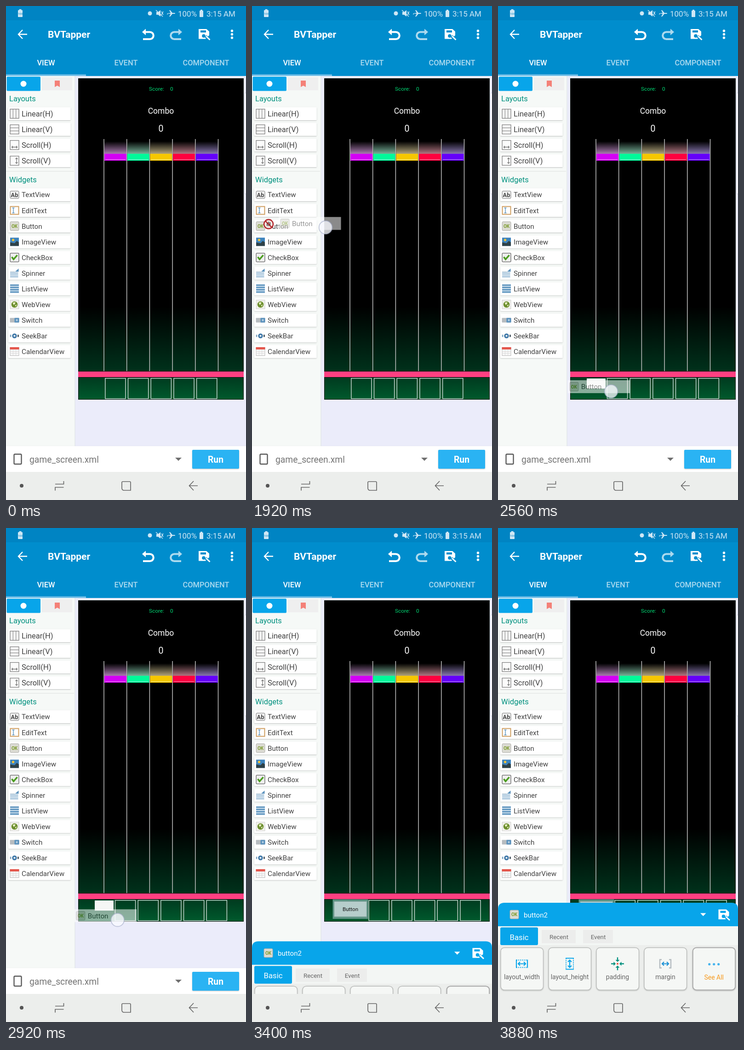
Animation, 522 px wide and 1073 px high, one loop 5.48 s. Source, as an HTML page:

```html
<!DOCTYPE html>
<html lang="en">
<head>
<meta charset="utf-8">
<title>Screen editor</title>
<style>
html, body { margin: 0; width: 100%; height: 100%; overflow: hidden; background: #ebecfa; }
svg { display: block; width: 522px; height: 1073px; font-family: Roboto, sans-serif; }
</style>
</head>
<body>
<svg id="stage" viewBox="0 0 522 1073" xmlns="http://www.w3.org/2000/svg"></svg>
<script>
const LOOP = 5480, STEP = 40;
const DRAG_START = 1760, OVER_ROW = 2520, DROP = 3160;
const PANEL = { top: 814, hidden: 1013, start: 3167, length: 663 };

const rect = (x, y, w, h, fill, more = '') =>
  `<rect x="${x}" y="${y}" width="${w}" height="${h}" fill="${fill}" ${more}/>`;
const path = (d, stroke, width = 1.5, more = '') =>
  `<path d="${d}" fill="none" stroke="${stroke}" stroke-width="${width}" ${more}/>`;
const shape = (d, fill) => `<path d="${d}" fill="${fill}"/>`;
const dot = (x, y, r, fill) => `<circle cx="${x}" cy="${y}" r="${r}" fill="${fill}"/>`;
const text = (x, y, size, fill, label, more = '') =>
  `<text x="${x}" y="${y}" font-size="${size}" fill="${fill}" ${more}>${label}</text>`;
const at = (x, y, body) => `<g transform="translate(${x} ${y})">${body}</g>`;
const mid = 'text-anchor="middle"';
const gradient = (id, stops, y1, y2) =>
  `<linearGradient id="${id}" gradientUnits="userSpaceOnUse" x1="0" x2="0" y1="${y1}" y2="${y2}">` +
  stops.map(([o, c, a = 1]) => `<stop offset="${o}" stop-color="${c}" stop-opacity="${a}"/>`).join('') +
  '</linearGradient>';

const GREY = '#858585', BLUE = '#08a5ea', BAR = '#008dcd', STEEL = '#5b92bd';
const TILES = ['#d400f5', '#00fa9a', '#f6c700', '#ff003f', '#6500fa'];
const GLOWS = ['#c08bc8', '#86c9ad', '#c8b98a', '#c98592', '#9a86c8'];

const box = rect(-9.5, -10, 19, 20, '#fcfcfc', `stroke="${GREY}" stroke-width="1.4"`);
const okIcon = rect(-9.5, -9.5, 19, 19, '#dcdcd4', 'rx="2" stroke="#a9a9a4"') +
  text(0, 3.8, 10, '#7d9c2e', 'OK', mid + ' font-weight="700"');

// Icons are centred on their own origin.
const icons = {
  'Linear(H)': box + path('M-3.2-10V10M3.2-10V10', GREY, 1.2),
  'Linear(V)': box + path('M-9.5-3.3H9.5M-9.5 3.3H9.5', GREY, 1.2),
  'Scroll(H)': box + path('M-6 4.5H6M-3.5 2L-6 4.5-3.5 7M3.5 2L6 4.5 3.5 7', '#777', 1.3),
  'Scroll(V)': box + path('M4.5-6V6M2-3.5L4.5-6 7-3.5M2 3.5L4.5 6 7 3.5', '#777', 1.3),
  TextView: rect(-9.5, -8, 19, 16, '#f0f0f0', 'rx="2" stroke="#777"') +
    text(0, 5, 13, '#333', 'Ab', mid + ' font-weight="500"'),
  EditText: rect(-9, -8.5, 18, 17, '#fff', 'stroke="#cf9f62" stroke-width="2"') +
    path('M-5-5.5H0M-2.5-5.5V5.5M-5 5.5H0', STEEL, 1.4),
  Button: okIcon,
  ImageView: rect(-9.5, -9, 19, 18, '#3e84bd') + dot(-3, -4, 2.6, '#f0c33b') +
    shape('M-9.5 1L-5 2 0 3 5-2 9.5 1V9H-9.5z', '#2e4148'),
  CheckBox: rect(-9.5, -9.5, 19, 19, '#eee', 'rx="2" stroke="#777" stroke-width="1.5"') +
    path('M-6-1L-2 4 6-5', '#4b9d20', 3.5),
  Spinner: path('M-9.5 0H8M-9.5 4H8M-9.5 8H8', STEEL, 1.4) + shape('M9-10V-3H1z', STEEL) +
    path('M-9.5-3H1', '#9ab6ca', 1.2),
  ListView: rect(-9.5, -9.5, 19, 19, '#d9e8f3') +
    path('M-9.5-8H9.5M-9.5-3H9.5M-9.5 2H9.5M-9.5 7H9.5', STEEL, 3),
  WebView: rect(-9.5, -9.5, 19, 19, '#f2f2ec', 'stroke="#ccc"') + dot(0, 0, 6.8, '#6d8f2e') +
    shape('M-4-4L2-5 1-1-2 1zM1 2L5 0 3 5z', '#e6edc2'),
  Switch: rect(-10, -5, 20, 10, '#b7bcc0', 'rx="1"') + rect(0, -5, 10, 10, STEEL, 'rx="1"') +
    path('M4-2V2M6-2V2', '#fff', 1),
  SeekBar: path('M-8.5-2.5V2.5', '#7ba3c0', 2.5) + path('M8-2.5V2.5', '#34434e', 2.5) +
    dot(0, 0, 5.2, '#3f78a8') + dot(0, 0, 2, '#fff'),
  CalendarView: rect(-9.5, -9, 19, 18, '#f6f6f6', 'stroke="#b9b9b9"') +
    rect(-10, -9.5, 20, 5, '#e4574d') + path('M-8 0H8M-8 4H8M-3-4V8M3-4V8', '#ddd', 1),
};

const item = (label, y, size) =>
  rect(5, y - 14, 135.5, 28, '#fff', 'rx="1" filter="url(#soft)"') +
  at(18.5, y, icons[label]) + text(34, y + size * .36, size, '#404040', label);

const saveIcon = ground => shape('M-12-11.5H5L11-6V2L3 10H-12z', '#fff') +
  rect(-8, -8.5, 12, 4.5, ground) + dot(-1, 3.5, 3.8, ground) +
  path('M3 4L12 12', ground, 6) + path('M4 4L12.5 12', '#fff', 3);
const turnArrow = path('M-8-5.5H4A7.7 7.7 0 0 1 4 10H-11', '#fff', 4.2) +
  shape('M-13-5.5L-5-12.5V1.5z', '#fff');

function header() {
  const status = '#cfe7f5';
  return rect(0, 0, 522, 152, BAR) + rect(0, 0, 522, 31, '#0084c3') +
    rect(26, 9, 10, 15, status, 'rx="1"') + rect(28.5, 7, 5, 3, status) +
    text(31, 19, 6, '#0084c3', '100', mid) +
    dot(313, 16, 4.5, status) +
    shape('M327 13h4l5-4v14l-5-4h-4z', status) +
    path('M326 9L341 23M338 12l4 7M342 12l-4 7', status, 1.5) +
    shape('M351 16l7-1-3-6h2l5 6h5q2 1 0 2h-5l-5 6h-2l3-6-5-.5-2 2h-1z', status) +
    text(374, 22.5, 17, status, '100%') +
    rect(421, 10, 8, 14, status, 'rx="1"') + rect(423, 8, 4, 3, status) +
    text(436, 22.5, 17, status, '3:15 AM') +
    path('M46 61.5H28M36 52L27 61.5 36 71', '#fff', 2.4) +
    text(91, 69, 21, '#fff', 'BVTapper', 'font-weight="700"') +
    at(309, 62, turnArrow) +
    `<g transform="translate(370 62) scale(-1 1)" opacity=".68">${turnArrow}</g>` +
    at(431, 61.5, saveIcon(BAR)) +
    [54, 61.5, 69].map(y => dot(491.5, y, 2.7, '#fff')).join('') +
    [['VIEW', 87, 1], ['EVENT', 261, .68], ['COMPONENT', 435, .68]].map(([s, x, a]) =>
      text(x, 128.5, 16.5, '#fff', s, `${mid} font-weight="500" fill-opacity="${a}"`)).join('') +
    rect(0, 148.5, 174, 3.5, '#73bfe8');
}

function sidebar() {
  const names = Object.keys(icons);
  return rect(0, 152, 150, 804, '#f6f9f7') + rect(149.5, 152, 1, 804, '#dcdfe4') +
    rect(1.5, 153.5, 73.5, 31, BLUE, 'rx="2"') + dot(38, 169, 6.5, '#fff') +
    rect(78, 155, 66, 28, '#efefef') + shape('M106 162h11v14l-5.5-3-5.5 3z', '#f48078') +
    text(7, 207, 16.5, '#00917f', 'Layouts') + text(7, 382.5, 16.5, '#00917f', 'Widgets') +
    rect(0, 358.5, 148, 1, '#dddfdd') +
    names.map((n, i) => i < 4 ? item(n, 234 + i * 34, 16.5) : item(n, 410 + (i - 4) * 34.05, 15.2)).join('');
}

function game() {
  const laneX = i => 213 + i * 49.7;
  return rect(157, 157, 360, 698, '#0a120e') + rect(158, 158, 358, 696, 'url(#night)') +
    text(311, 184, 11.8, '#00d873', 'Score:') + text(357, 184, 11.8, '#00d873', '0') +
    text(337, 233.5, 17.5, '#fff', 'Combo', mid) + text(337, 273, 19.5, '#fff', '0', mid) +
    TILES.map((c, i) => {
      const x = laneX(i) + 1;
      return rect(x, 292, 48, 29, `url(#glow${i})`) + rect(x, 321, 48, 15, c) +
        path(`M${x + 2} 333.5h44`, '#fff', 1, 'opacity=".6"');
    }).join('') +
    [0, 1, 2, 3, 4, 5].map(i => path(`M${laneX(i)} 289V793`, '#c4c4c4', 1.5)).join('') +
    rect(157, 793, 360, 14, '#191014') + rect(157, 794, 360, 12, '#ff4081') +
    rect(193, 809, 41, 22, '#f5f7f5', 'id="slot"') +
    '<g id="pads">' + TILES.map((_, i) =>
      rect(215.8 + i * 49.7, 808.7, 44.2, 44.2, 'none', 'stroke="#c9d8cf" stroke-width="1.5"')).join('') + '</g>' +
    '<g id="button">' + rect(175.5, 806.5, 77, 42.5, '#5f9283') +
    rect(179, 811.5, 70, 32.5, '#b6cdcb', 'stroke="#98b5b1"') +
    text(214, 832, 11.6, '#111', 'Button', mid) + '</g>' +
    rect(518.5, 188.5, 8, 220, '#f8f8fd', 'rx="3" stroke="#cfd2e0"');
}

function fileBar() {
  return rect(0, 956, 522, 57, '#fff', 'filter="url(#soft)"') +
    rect(17.5, 973.5, 16, 21.5, 'none', 'rx="2" stroke="#5c5c5c" stroke-width="2.4"') +
    text(51, 991.5, 19.3, '#757575', 'game_screen.xml') +
    shape('M368 981h14l-7 7z', '#707070') +
    rect(405, 964, 102, 41, '#2cb3f3', 'rx="2" filter="url(#soft)"') +
    text(456, 992, 19.3, '#fff', 'Run', mid + ' font-weight="700"');
}

function panel() {
  const width = path('M-12-8H12M-12 8H12', BLUE, 2, 'stroke-dasharray="2 2"') +
    path('M-12-9V9M12-9V9M-8 0H8M-4-4L-8 0-4 4M4-4L8 0 4 4', BLUE, 2.2);
  const arrow = a => `<g transform="rotate(${a})">` + path('M0-14V-7', '#00917f', 2.4) +
    shape('M-4.5-8.5H4.5L0-4z', '#00917f') + '</g>';
  const margin = path('M-8-9H-12V9H-8M8-9H12V9H8', '#b4bcc0', 2.4) +
    path('M-7 0H7M-3-4L-7 0-3 4M3-4L7 0 3 4', '#1b91d6', 2.2);
  const cards = [
    ['layout_width', width],
    ['layout_height', `<g transform="rotate(90)">${width}</g>`],
    ['padding', [0, 90, 180, 270].map(arrow).join('') + dot(0, 0, 2, '#e8533f')],
    ['margin', margin],
    ['See All', [-10, 0, 10].map(x => dot(x, 1, 2.6, '#47b4ee')).join('')],
  ];
  return '<g id="panel">' +
    shape('M0 260V14Q0 0 14 0H508Q522 0 522 14V260z', BLUE) +
    rect(0, 51, 522, 210, '#f3f6f4') + rect(0, 92, 522, 169, '#eceeec') +
    at(35.5, 25.5, okIcon) + text(56, 31.5, 15.1, '#fff', 'button2') +
    shape('M440 22.5h12.5l-6.2 6.5z', '#fff') + at(491.5, 26, saveIcon(BLUE)) +
    rect(5, 53.5, 82, 38.5, BLUE, 'rx="3"') + text(46, 80.5, 16.8, '#fff', 'Basic', mid) +
    rect(95, 59, 74, 29, '#ecedec') + text(132.5, 79, 13.4, '#666', 'Recent', mid) +
    rect(185, 59, 65, 29, '#ecedec') + text(218, 79, 13.4, '#666', 'Event', mid) +
    cards.map(([label, icon], i) => {
      const last = i === 4, x = 52 + i * 104 + (last ? 1.7 : 0);
      return rect(x - 46, 97.5, 92.5, 92, '#f5f7f5',
        `rx="8" stroke="${last ? '#a9a9a9' : '#b9bbb9'}" stroke-width="${last ? 2 : 1.4}" filter="url(#soft)"`) +
        at(x, 132.5, icon) + text(x, last ? 166.5 : 165.5, 14, last ? '#f79a1e' : '#666', label, mid);
    }).join('') + '</g>';
}

function navBar() {
  const c = '#686868';
  return rect(0, 1012, 522, 61, '#eceeec') + dot(34, 1042, 4, '#555') +
    path('M107 1038.5H125.5V1032M125.5 1045.5H107V1052.5', c, 1.7) +
    path('M252 1047V1035Q252 1033 254 1033H269Q271 1033 271 1035V1052H257Q252 1052 252 1047z', c, 1.7) +
    path('M417 1042H399M408 1032L398.5 1042 408 1052', c, 1.7);
}

const stage = document.getElementById('stage');
stage.innerHTML = '<defs>' +
  '<filter id="soft" x="-5%" y="-20%" width="110%" height="150%"><feDropShadow dx="0" dy="1" stdDeviation="1" flood-opacity=".24"/></filter>' +
  gradient('night', [[0, '#000'], [.71, '#000'], [.91, '#00311b'], [1, '#005a2d']], 157, 855) +
  GLOWS.map((c, i) => gradient('glow' + i, [[0, c, 0], [1, c, .85]], 294, 320)).join('') +
  '</defs>' + rect(0, 0, 522, 1073, '#ebecfa') + game() + sidebar() + header() + fileBar() +
  `<g id="ghost" opacity=".54">${rect(5, 464, 135.5, 28, '#fff')}${at(18.5, 478, okIcon)}${text(34, 483.5, 15.2, '#404040', 'Button')}</g>` +
  '<g id="denied">' + dot(0, 0, 10.5, '#efe4e0') + path('M-3 4V-3M0 4V-5M3 4V-4', '#555', 2) +
  '<circle r="10" fill="none" stroke="#b3262b" stroke-width="2.4"/>' + path('M-7-7L7 7', '#b3262b', 2.4) + '</g>' +
  '<circle id="touch" r="14.3" fill="#f8faff" fill-opacity=".78" stroke="#a4abc8" stroke-opacity=".6" stroke-width="2"/>' +
  panel() + navBar();

const part = Object.fromEntries(['slot', 'pads', 'button', 'ghost', 'denied', 'touch', 'panel']
  .map(id => [id, document.getElementById(id)]));

// time, x, y of the finger
const finger = [
  [1240, 97, 484], [1720, 97, 484], [1800, 107, 483], [1920, 160, 481], [2040, 193, 502],
  [2200, 222, 595], [2360, 239, 740], [2480, 245, 832], [2560, 246, 837],
  [2680, 245, 846], [2840, 243, 851], [3120, 242, 852],
];

function fingerAt(t) {
  const i = finger.findIndex(k => k[0] > t);
  if (i < 1) return (i ? finger[finger.length - 1] : finger[0]).slice(1);
  const [a, b] = [finger[i - 1], finger[i]], p = (t - a[0]) / (b[0] - a[0]);
  return [a[1] + (b[1] - a[1]) * p, a[2] + (b[2] - a[2]) * p];
}

const clamp = v => Math.max(0, Math.min(1, v));
const show = (el, on) => el.style.visibility = on ? 'visible' : 'hidden';
const move = (el, x, y) => el.setAttribute('transform', `translate(${x} ${y})`);

function draw(t) {
  const dragging = t >= DRAG_START && t < DROP;
  const overRow = t >= OVER_ROW && t < DROP;
  move(part.touch, ...fingerAt(t));
  part.touch.setAttribute('opacity', t < 1240 ? 0 : 1 - clamp((t - DROP + 20) / 170));

  // The dragged copy trails the finger slightly.
  const [x, y] = fingerAt(t - 18);
  move(part.ghost, x - 99, y - 487);
  move(part.denied, x - 116, y - 7.5);
  show(part.ghost, dragging);
  show(part.denied, dragging && t < 2000);

  show(part.slot, overRow);
  show(part.button, t >= DROP);
  move(part.pads, t >= DROP ? 38.3 : overRow ? 21.6 : 0, 0);

  const left = 1 - clamp((t - PANEL.start) / PANEL.length);
  move(part.panel, 0, PANEL.top + (PANEL.hidden - PANEL.top) * left * left);
}

const start = performance.now();
function tick() {
  const t = (performance.now() - start) % LOOP;
  draw(Math.floor(t / STEP) * STEP);
  requestAnimationFrame(tick);
}
tick();
</script>
</body>
</html>
```
